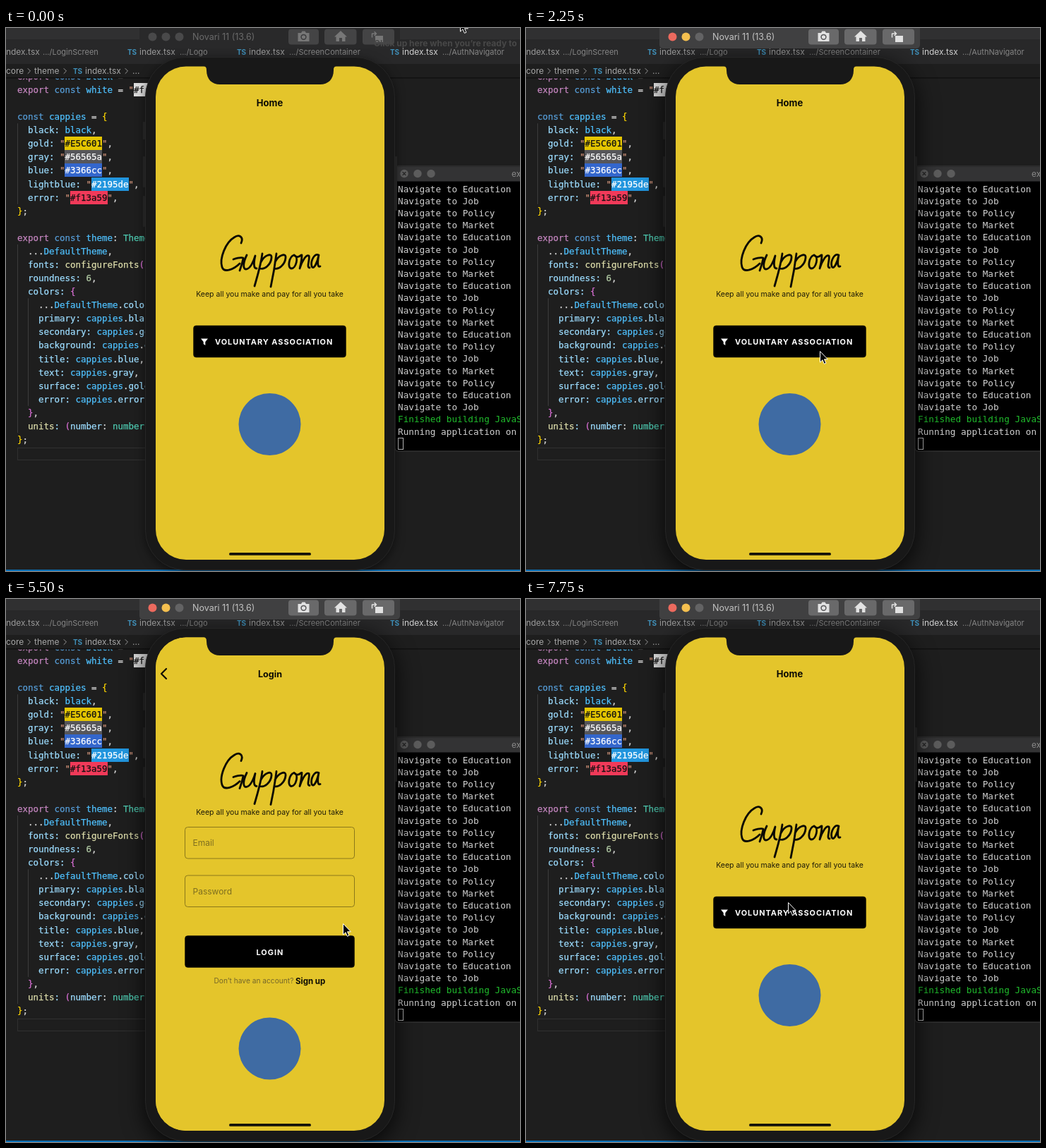
Recreate the animation shown at these times as an HTML page. Size 728 by 770 pixels, loop 8000 ms.

```html
<!DOCTYPE html>
<html lang="en">
<head>
<meta charset="utf-8">
<title>App login walkthrough</title>
<style>
html, body { margin: 0; width: 100%; height: 100%; overflow: hidden; background: #1e1e1e; }
svg { display: block; width: 728px; height: 770px; }
text { font-family: Inter, Roboto, sans-serif; white-space: pre; }
.mono { font-family: "DejaVu Sans Mono", "Liberation Mono", monospace; }
.mono tspan { fill: currentColor; stroke: currentColor; stroke-width: .25; }
.k { color: #c586c0 } .c { color: #569cd6 } .v { color: #4fc1ff } .p { color: #d4d4d4 }
.n { color: #9cdcfe } .s { color: #ce9178 } .f { color: #dcdcaa } .t { color: #4ec9b0 }
.d { color: #b5cea8 } .g { color: #ffd700 } .m { color: #da70d6 } .w { color: #fff } .b { color: #111 }
#bar { fill: #29292a } #bar.on { fill: #404041 }
#chrome { opacity: .42 } #chrome.on { opacity: 1 }
#bezel { filter: drop-shadow(0 3px 7px #0008) } #bezel.on { filter: drop-shadow(0 8px 16px #000c) }
</style>
</head>
<body>
<svg id="stage" viewBox="0 0 728 770"></svg>
<script>
const GOLD = '#e4c52b';
const $ = id => document.getElementById(id);

const rect = (x, y, w, h, fill, r = 0, more = '') =>
  `<rect x="${x}" y="${y}" width="${w}" height="${h}" rx="${r}" fill="${fill}" ${more}/>`;
// y is the vertical middle of the line
const text = (x, y, size, fill, str, more = '') =>
  `<text x="${x}" y="${y + size * .36}" font-size="${size}" fill="${fill}" ${more}>${str}</text>`;
const line = (d, color, width, more = '') =>
  `<path d="${d}" fill="none" stroke="${color}" stroke-width="${width}" stroke-linecap="round" stroke-linejoin="round" ${more}/>`;
const bold = 'font-weight="700"', mid = ' text-anchor="middle"';

// Code lines: row, indent, then parts whose first letter is the colour class
const CODE = 12.46, CH = CODE * .602;
const rowY = row => 68.4 + row * 19.08;
const prop = (name, member) => `n${name}:|p |vcappies|p.|n${member}`;
const code = [
  [0, 0, 'kexport |cconst |vblack|p = |s"'],
  [1, 0, 'kexport |cconst |vwhite|p = |s"|b#f'],
  [3, 0, 'cconst |vcappies|p = |g{'],
  [4, 2, 'nblack:|p |vblack|p,'],
  [5, 2, 'ngold:|p |s"|b#E5C601|s"|p,'],
  [6, 2, 'ngray:|p |s"|w#56565a|s"|p,'],
  [7, 2, 'nblue:|p |s"|w#3366cc|s"|p,'],
  [8, 2, 'nlightblue:|p |s"|w#2195de|s"|p,'],
  [9, 2, 'nerror:|p |s"|b#f13a59|s"|p,'],
  [10, 0, 'g}|p;'],
  [12, 0, 'kexport |cconst |vtheme|p: |tTheme'],
  [13, 2, 'p...|vDefaultTheme|p,'],
  [14, 2, 'nfonts:|p |fconfigureFonts|m('],
  [15, 2, 'nroundness:|p |d6|p,'],
  [16, 2, 'ncolors:|p |m{'],
  [17, 4, 'p...|vDefaultTheme|p.|ncolors'],
  [18, 4, prop('primary', 'black')],
  [19, 4, prop('secondary', 'gold')],
  [20, 4, prop('background', 'gold')],
  [21, 4, prop('title', 'blue') + '|p,'],
  [22, 4, prop('text', 'gray') + '|p,'],
  [23, 4, prop('surface', 'gold')],
  [24, 4, prop('error', 'error')],
  [25, 2, 'm}|p,'],
  [26, 2, 'funits|n:|p |m(|nnumber|p: |tnumber'],
  [27, 0, 'g}|p;'],
];
const swatches = [[1, 22, '#dcdcdc'], [5, 9, '#e5c601'], [6, 9, '#56565a'], [7, 9, '#3366cc'], [8, 14, '#2195de'], [9, 10, '#f13a59']];

function editor() {
  const guide = (x, a, b) => rect(x, rowY(a) - 9.5, 1, (b - a + 1) * 19.08, '#3c3c3c');
  const marks = swatches.map(([row, col, fill]) =>
    rect(Math.floor(16 + col * CH), Math.round(rowY(row) - 9.5), 53, 19, fill)).join('');
  const rows = code.map(([row, indent, parts]) => text(16 + indent * CH, rowY(row), CODE, '#d4d4d4',
    parts.split('|').map(p => `<tspan class="${p[0]}">${p.slice(1)}</tspan>`).join(''), 'class="mono"')).join('');
  const ts = (x, y) => text(x, y, 10, '#3f8fb8', 'TS', bold);
  const tab = (x, dir, fill) => ts(x - 17, 34) + text(x, 34, 12, fill, 'index.tsx') +
    text(x + 57, 34, 11, '#858585', '.../' + dir);
  const crumb = (x, str) => text(x, 61, 12, '#a6a6a6', str);
  const arrow = x => line(`M${x - 2} 57.5l3.5 3.5l-3.5 3.5`, '#999', 1);
  return rect(0, 0, 728, 770, '#1e1e1e') + guide(16, 4, 9) + guide(16, 13, 26) + guide(31, 17, 24) +
    rect(16.5, 595.5, 190, 17, 'none', 0, 'stroke="#303030"') + marks + rows +
    rect(0, 0, 728, 16, '#303031') + rect(0, 16, 728, 35, '#282829') +
    rect(0, 51, 728, 19, '#1e1e1e') + rect(0, 70, 728, 1.5, '#111') +
    text(-3, 34, 12, '#999', 'index.tsx') + text(52, 34, 11, '#858585', '.../LoginScreen') +
    tab(189, 'Logo', '#999') + tab(344, 'ScreenContainer', '#999') + tab(561, 'AuthNavigator', '#d0d0d0') +
    crumb(0, 'core') + arrow(33) + crumb(40, 'theme') + arrow(84) + ts(95, 61) + crumb(112, 'index.tsx') + arrow(171) + crumb(179, '...') +
    rect(0, 768, 728, 2, '#0a70b8');
}

function terminal() {
  const pages = { E: 'Education', J: 'Job', P: 'Policy', M: 'Market' };
  const log = [...'EJPMEJPMEJPMEPJMPEJ'].map(p => 'Navigate to ' + pages[p]);
  log.push('Finished building JavaScript', 'Running application on');
  const rows = log.map((s, i) => text(555, 228 + i * 17.2, 12.7, i == 19 ? '#20bd2d' : '#d0d0d0', s, 'class="mono"')).join('');
  const dots = [564, 583, 602].map(x => `<circle cx="${x}" cy="206.5" r="5.7" fill="#5c5c5c"/>`).join('');
  return rect(551, 196, 190, 404, '#000', 4, 'stroke="#404040"') + rect(551.5, 196.5, 190, 21, '#333334', 4) + dots +
    line('M562 204.500l4 4m0 -4l-4 4', '#262626', 1.2) + text(716, 206.5, 12, '#8a8a8a', 'ex') + rows +
    rect(555.5, 581.5, 7, 16, 'none', 0, 'stroke="#bbb"');
}

const wordmark = [
  'M333 305C337 296 330 292 323 297C311 304 302 327 306 339C309 348 323 342 331 334M322 328C328 326 333 325 336 326C335 333 333 338 331 344',
  'M341 322C336 332 335 342 340 342C346 342 351 330 353 323C351 332 350 341 355 341',
  'M363 320C361 336 356 352 352 366M361 332C366 322 377 318 376 326C375 336 366 343 360 341',
  'M383 320C381 336 378 353 375 367M381 332C386 322 397 318 396 326C395 336 386 343 380 341',
  'M408 322C401 324 398 340 404 341C411 341 415 324 408 322C411 326 415 325 418 322',
  'M419 322C419 330 417 336 416 341C419 331 425 321 429 323C431 327 425 340 430 340',
  'M443 322C437 319 431 330 433 338C436 344 441 332 443 322C441 332 441 340 445 338',
].join('');

const brand = dy => `<g transform="translate(0 ${dy})">` + line(wordmark, '#0b0a04', 2.8) +
  text(373.5, 377.5, 10.5, '#1d1a08', 'Keep all you make and pay for all you take', mid) + '</g>';
const emblem = y => `<circle cx="373.5" cy="${y}" r="44" fill="#3f6ba3"/>`;
const button = (x, y, w) => rect(x, y, w, 45, '#000', 4, 'stroke="#000" stroke-opacity=".4"');
const label = (x, y, str) => text(x, y, 10.9, '#fff', str, bold + ' letter-spacing="1"');

function home() {
  return rect(212, 54, 324, 701, GOLD) + brand(0) + button(265.5, 422, 216) +
    '<path d="M276 440.500h10l-3.700 4.500v5l-2.600-2v-3z" fill="#fff"/>' +
    label(296, 445.5, 'VOLUNTARY ASSOCIATION') + emblem(562);
}

function login() {
  const field = (y, str) => rect(253.5, y, 240, 44.5, 'none', 4, 'stroke="#8b781a"') + text(264.5, y + 22.5, 12, '#7d6e20', str);
  return rect(202, 54, 10, 701, 'url(#edge)') + rect(212, 54, 324, 701, GOLD) + brand(-75.5) +
    field(323.5, 'Email') + field(392, 'Password') + button(253.5, 477.5, 240) +
    label(354.5, 501, 'LOGIN') + text(294.5, 541.5, 10.2, '#75672a', 'Don’t have an account?') +
    text(410, 541.5, 11.5, '#0b0a04', 'Sign up', bold) + emblem(637.5);
}

function phone() {
  const side = (x, y, h) => rect(x, y, 3, h, '#2c2c2c', 1);
  return side(194, 133, 25) + side(194, 182, 44) + side(194, 238, 44) + side(551, 182, 77) +
    rect(197.5, 41.5, 353, 727, '#181818', 56, 'id="bezel" stroke="#262626"') +
    '<g clip-path="url(#screen)"><g id="home">' + home() + '</g><g id="login">' + login() + '</g></g>' +
    text(373.5, 106, 13, '#0b0a04', 'Home', bold + mid + ' id="homeTitle"') +
    text(374, 106, 12.6, '#0b0a04', 'Login', bold + mid + ' id="loginTitle"') +
    line('M227 99l-7 7l7 7', '#0b0a04', 2.2, 'id="back"') +
    '<path d="M278 53.500C283 54 284 56 284 60C284 73 292 80 303 80H445C456 80 464 73 464 60C464 56 465 54 470 53.500Z" fill="#181818"/>' +
    rect(316, 744, 116, 3.8, '#14120a', 1.9);
}

function toolbar() {
  const dot = (x, id) => `<circle id="${id}" cx="${x}" cy="12.500" r="6"/>`;
  const key = (x, w) => rect(x, 1.5, w, 22, '#69696a', 4);
  const icon = d => `<path d="${d}" fill="#e2e2e2"/>`;
  return '<rect id="bar" x="189" y="-6" width="369" height="35" rx="5"/><g id="chrome">' +
    dot(207.5, 'red') + dot(226.5, 'amber') + dot(245.5, 'grey') +
    text(264, 12.5, 12.5, '#c2c2c2', 'Novari 11 (13.6)') + key(400, 43) + key(451, 45.5) + key(505, 45) +
    icon('M413.500 7h4.500l1.500-2.500h4l1.500 2.500h4.500v12h-16z') +
    '<circle cx="421.500" cy="12.800" r="3.400" fill="none" stroke="#58585a" stroke-width="1.500"/>' +
    icon('M474 4l9 8.500h-2.500v6.500h-4.500v-5h-4v5h-4.500v-6.500h-2.500z') +
    icon('M523 11h11v9h-11z') + line('M518.500 13v-5h6m-2.500-2.500l2.500 2.500l-2.500 2.500', '#e2e2e2', 1.5) + '</g>';
}

$('stage').innerHTML = `<defs>
  <clipPath id="screen"><rect x="212" y="54.5" width="324" height="699.5" rx="43"/></clipPath>
  <linearGradient id="edge"><stop offset="0" stop-opacity="0"/><stop offset="1" stop-opacity=".14"/></linearGradient>
</defs>` + editor() + terminal() + phone() + toolbar() +
  text(521, 22, 12, '#484848', 'Click up here when you’re ready to', bold + ' id="hint"') +
  '<path id="pointer" d="M.5 .500V16L4 12.700L6.400 18.300L8.900 17.200L6.500 11.800H11.300Z" fill="#000" stroke="#fff"/>';

// Pointer steps: time, x, y
const moves = [
  [0, 643, -11], [250, 474, 432], [500, 467, 451], [750, 456, 526], [1250, 435, 487], [1500, 417, 459],
  [1750, 416, 458], [3750, 437, 458], [4000, 472, 459], [4250, 484, 462], [5500, 477, 460], [5750, 233, 187],
  [6000, 220, 123], [6250, 218, 106], [7000, 223, 116], [7250, 378, 350], [7500, 371, 409], [7750, 371, 430],
];
const LOOP = 8000, STEP = 250, PUSH = 2290, POP = 6483, WIDTH = 324;

// Critically damped spring from 0 to 1
const spring = x => x <= 0 ? 0 : 1 - (1 + x) * Math.exp(-x);
const shift = (id, x, y = 0) => $(id).setAttribute('transform', `translate(${x} ${y})`);
const fade = (id, value) => $(id).setAttribute('opacity', value);

function draw(t) {
  const [, x, y] = moves.findLast(m => m[0] <= t);
  shift('pointer', x, y);

  const shown = spring((t - PUSH) * .0157) - spring((t - POP) * .018);
  const offset = Math.round(WIDTH * (1 - shown));
  const p = 1 - offset / WIDTH;
  shift('login', offset);
  shift('home', -.3 * WIDTH * p);
  fade('login', offset < WIDTH ? 1 : 0);
  fade('homeTitle', 1 - p);
  fade('loginTitle', p);
  fade('back', t >= POP ? p * .65 : p);

  const active = t >= 2250;
  for (const id of ['bar', 'chrome', 'bezel']) $(id).classList.toggle('on', active);
  $('red').setAttribute('fill', active ? '#ec6a5e' : '#777');
  $('amber').setAttribute('fill', active ? '#f4bf4f' : '#777');
  $('grey').setAttribute('fill', active ? '#636364' : '#777');
  fade('hint', t < 250 ? 1 : 0);
}

const start = performance.now();
function tick(now) {
  const t = Math.max(0, now - start) % LOOP;
  draw(Math.floor(t / STEP) * STEP);
  requestAnimationFrame(tick);
}
draw(0);
requestAnimationFrame(tick);
</script>
</body>
</html>
```
